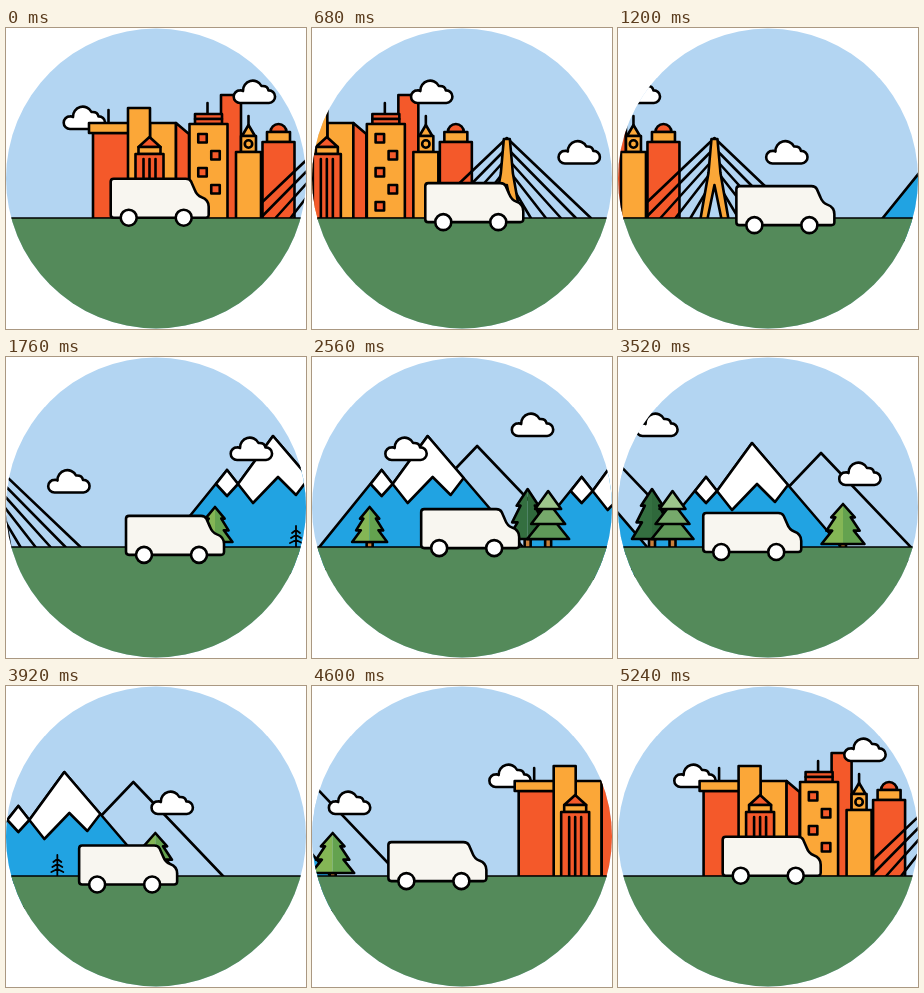
These frames come from a looping animation (300 px wide and 301 px high, 5.28 s). An HTML page:

```html
<!DOCTYPE html>
<html lang="en">
<head>
<meta charset="utf-8">
<title>Van trip</title>
<style>
html, body { margin: 0; width: 100%; height: 100%; overflow: hidden; background: #fff; }
svg { display: block; width: 100%; height: 100%; }
</style>
</head>
<body>
<svg id="stage" viewBox="0 0 300 301"></svg>
<script>
const LOOP = 5280, STEP = 40, TRAVEL = LOOP - STEP, WIDTH = 990, SPEED = .1892, GROUND = 190;
const SKY = '#b3d5f2', GRASS = '#548a5a', RED = '#f4592a', ORANGE = '#fba738',
      BLUE = '#21a3e2', WHITE = '#fff', CREAM = '#f8f6f0', BROWN = '#c9803a';

const range = n => [...Array(n).keys()];
const repeat = (n, make) => range(n).map(make).join('');
const path = (d, fill = 'none', more = '') => `<path d="${d}" fill="${fill}" ${more}/>`;
const poly = (pts, fill) => path('M' + pts.join('L') + 'Z', fill);
const at = (x, y, body) => `<g transform="translate(${x} ${y})">${body}</g>`;
const circle = (x, y, r, fill) => `<circle cx="${x}" cy="${y}" r="${r}" fill="${fill}"/>`;
// Block centred on x, standing on the ground unless a base is given.
const block = (x, width, top, fill, base = GROUND + 1) =>
  path(`M${x - width / 2} ${top}h${width}V${base}h${-width}Z`, fill);
const gable = (x, width, top, base, fill) =>
  poly([[x, top], [x + width / 2, base], [x - width / 2, base]], fill);
const mast = (x, top, base) => path(`M${x} ${top}V${base}`);

const cloud = (x, base) => at(x, base, path(
  'M-14.5 0A6.3 6.3 0 0 1-14.5-12.6Q-12.5-12.8-11.5-12A9.8 9.8 0 0 1 7-17Q13-17.5 14-12.6A6.3 6.3 0 0 1 14.5 0Z', WHITE));

const hall = x =>
  gable(x, 22, 109, 119, RED) + block(x, 22, 119, ORANGE, 126) + block(x, 28, 126, RED) +
  repeat(3, i => mast(x - 6 + 6 * i, 131, GROUND));

const office = x =>
  mast(x - 1, 75, 86) + block(x, 27, 86, RED, 91) + block(x, 27, 91, RED, 96) + block(x, 38, 96, ORANGE) +
  repeat(5, i => block(x + (i % 2 ? 7 : -6), 8.5, 106 + 17 * i, RED, 114.5 + 17 * i));

const clockTower = x =>
  mast(x, 88, 98) + gable(x, 13, 97, 108, ORANGE) + block(x, 15, 108, ORANGE, 124) +
  circle(x, 116, 3.7, ORANGE) + block(x, 25, 124, ORANGE);

const domeTower = x =>
  path(`M${x - 8} 104a8 8 0 0 1 16 0Z`, RED) + block(x, 23, 104, ORANGE, 114) + block(x, 32, 114, RED);

const bridge = x =>
  path(repeat(5, i => {
    const reach = 84 - 15 * i;
    return `M${x - reach} ${GROUND}L${x} ${110 + 10 * i}L${x + reach} ${GROUND}`;
  })) +
  path(`M${x - 3} 111h6L${x + 6} 145L${x + 14} 191h-7L${x} 157L${x - 7} 191h-7L${x - 6} 145Z`, ORANGE);

const city =
  mast(102.5, 82, 95) + block(105, 36, 105, RED) + block(103, 40, 95, ORANGE, 105) +
  block(157, 26, 95, ORANGE) + block(133, 22, 80, ORANGE) +
  path('M170 95L183 106V191H170Z', RED) + hall(143.5) +
  block(225, 20, 67, RED) + office(202.5) + domeTower(272.500) + bridge(323.5) + clockTower(242.5);

// Snowy twin peaks before a bare one.
const ridge = (x, y, backX, backY) =>
  gable(backX, 206, backY, backY + 108, SKY) +
  at(x, y,
    poly([[-126, 133], [-46, 34], [-35, 48], [0, 0], [120, 140]], BLUE) +
    poly([[-46, 34], [-35, 48], [-46, 60], [-57, 48]], WHITE) +
    poly([[0, 0], [36, 42], [23, 59], [5, 41], [-20, 67], [-35, 48]], WHITE));

const trunk = (x, top) => block(x, 6, top, BROWN);

// Three tiers, each a step out and back in.
function fir(x, top, base, half, left, right) {
  const side = s => range(3).flatMap(i => {
    const out = s * half * (.55 + .225 * i), y = top + (base - top) * (i + 1) / 3;
    return [[x + out, y], [x + (i < 2 ? out * .65 : 0), y]];
  });
  const l = side(-1), r = side(1), tip = [x, top];
  return trunk(x, base) +
    `<g stroke="none">${poly([tip, ...l], left)}${poly([tip, ...r], right)}</g>` +
    poly([tip, ...r, ...l.reverse()], 'none');
}

const layeredFir = x => trunk(x, 182) +
  ['#5f9858', '#76a96b', '#9cc48b'].map((fill, i) =>
    gable(x, 42 - 8 * i, 156 - 11 * i, 182 - 15 * i, fill)).join('');

const twig = x => at(x, 170, path(
  'M0-1V20' + repeat(3, i => `M${-4 - i} ${6 + 5 * i}L0 ${3 + 5 * i}L${4 + i} ${6 + 5 * i}`), 'none', 'stroke-width="1.8"'));

const LIGHT = ['#84b655', '#64a24f'];
const world =
  cloud(78.5, 101) + city +
  ridge(600, 79, 649.5, 89) + ridge(800, 86, 869, 96) +
  repeat(4, i => twig(623 + 17 * (i % 2) + 170 * (i >> 1) + (i > 2 ? 16 : 0))) +
  fir(542, 150, 185, 17.5, ...LIGHT) +
  fir(700, 132, 182, 20, '#346f40', '#2f683b') + layeredFir(720.5) +
  fir(891, 147, 187, 21.5, ...LIGHT) +
  cloud(248.5, 75) + cloud(396, 135.5) + cloud(578.5, 103) + cloud(705, 79) + cloud(908, 128);

const van = path('M-15-39H57Q61-39 62.500-36L66-28Q68-22.500 73-20.500Q80-18 80-11V-3Q80 0 77 0H-15Q-18 0-18-3V-36Q-18-39-15-39Z', CREAM) +
  circle(0, 0, 8, WHITE) + circle(55, 0, 8, WHITE);

document.getElementById('stage').innerHTML = `
  <clipPath id="disc">${circle(150, 150.5, 150)}</clipPath>
  <g clip-path="url(#disc)" stroke="#000" stroke-width="2.600" stroke-linejoin="round" stroke-linecap="round">
    <path d="M0 0H300V301H0Z" fill="${SKY}" stroke="none"/>
    <g id="scene"><g id="world">${world}</g><use href="#world" x="${WIDTH}"/></g>
    <path d="M0 ${GROUND}H300V301H0Z" fill="${GRASS}" stroke="none"/>
    <path d="M0 ${GROUND}H300" stroke-width="1.500"/>
    <g id="van">${van}</g>
  </g>`;
const scene = document.getElementById('scene'), vanNode = document.getElementById('van');

// Closed Catmull-Rom curve through evenly timed keys.
function drift(keys, t) {
  const n = keys.length, pos = t / TRAVEL * n, i = Math.floor(pos), u = pos - i;
  const [a, b, c, d] = range(4).map(k => keys[(i + k + n - 1) % n]);
  return b + u / 2 * (c - a + u * (2 * a - 5 * b + 4 * c - d + u * (3 * (b - c) + d - a)));
}
const VAN_X = [122.7, 131, 137, 137, 126, 111.5, 91, 94];
const VAN_Y = [189.7, 194, 197.500, 197.200, 190.800, 192.700, 198.500, 195.200];

function draw() {
  const t = Math.min(Math.floor(performance.now() % LOOP / STEP) * STEP, TRAVEL);
  scene.setAttribute('transform', `translate(${-SPEED * t} 0)`);
  vanNode.setAttribute('transform', `translate(${drift(VAN_X, t)} ${drift(VAN_Y, t)})`);
  requestAnimationFrame(draw);
}
draw();
</script>
</body>
</html>
```
